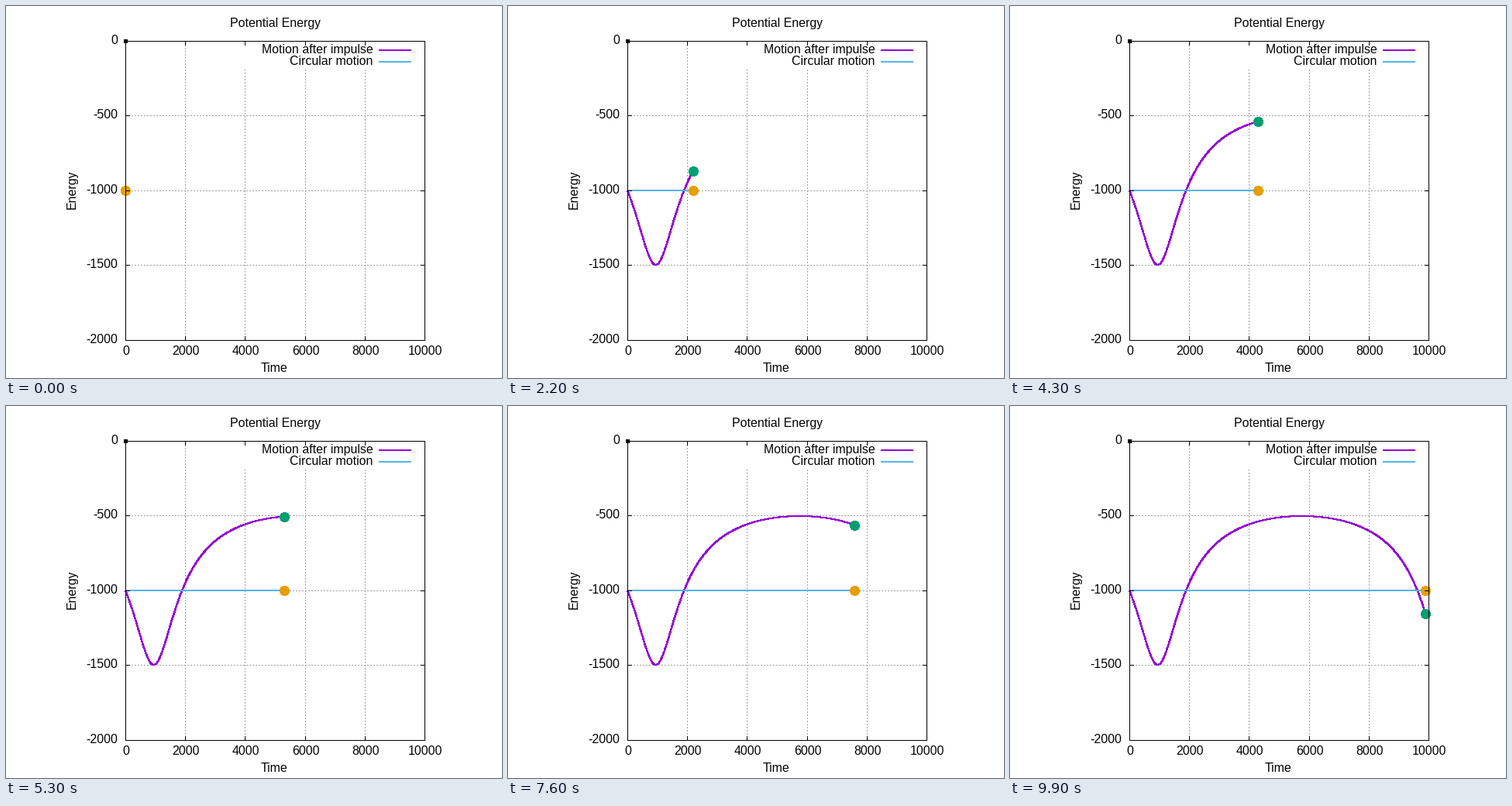
These frames come from a looping animation (640x480 px, 10000 ms). A matplotlib script:

```python
import numpy as np
import matplotlib.pyplot as plt
from matplotlib.animation import FuncAnimation
from matplotlib.patches import Circle

plt.rcParams.update({
    "font.family": "Liberation Sans",
    "text.hinting": "default",
    "path.simplify": False,
    "toolbar": "None",
})

DPI = 100
PX = 72 / DPI                      # one pixel in points
FRAMES, STEP = 100, 100
LEFT, RIGHT, TOP, BOTTOM = 154, 540, 45, 431
PURPLE, GREEN, BLUE, ORANGE = "#9400d3", "#009e73", "#56b4e9", "#e69f00"
GRID = "#a0a0a0"


def to_x(t):
    return np.floor(LEFT + 0.05 + np.asarray(t) * (RIGHT - LEFT) / 10000 + 0.5)


def to_y(u):
    return np.ceil(TOP - np.asarray(u) * (BOTTOM - TOP) / 2000 - 0.5)


# Kepler orbit with unit semi-latus rectum, entered inward at a right angle
# to the periapsis; times are scaled so that circular motion has n = 1/1000.
ECC = 0.4975
AXIS = 1 / (1 - ECC ** 2)
anomaly = np.linspace(-np.arccos(ECC), 2 * np.pi, 6000)
mean = anomaly - ECC * np.sin(anomaly)
orbit_t = 1000 * AXIS ** 1.5 * (mean - mean[0])
orbit_u = -1000 / (AXIS * (1 - ECC * np.cos(anomaly)))


def potential(t):
    return np.interp(t, orbit_t, orbit_u)


fig = plt.figure(figsize=(640 / DPI, 480 / DPI), dpi=DPI, facecolor="white")
ax = fig.add_axes([0, 0, 1, 1])
ax.set_xlim(0, 640)
ax.set_ylim(480, 0)
ax.axis("off")


def line(x, y, color="black", width=1, z=5, **kw):
    return ax.plot(x, y, color=color, lw=width * PX, zorder=z, snap=False,
                   solid_capstyle="butt", dash_capstyle="butt", **kw)[0]


def hline(y, x0, x1, **kw):
    """One pixel row, filled from column x0 to column x1."""
    line([x0, x1 + 1], [y + 0.5, y + 0.5], **kw)


def vline(x, y0, y1, **kw):
    """One pixel column, filled from row y1 up to row y0."""
    line([x + 0.5, x + 0.5], [y1 + 1, y0], **kw)


def label(x, y, text, ha="center", **kw):
    ax.text(x, y, text, ha=ha, va="baseline", fontsize=16 * PX, zorder=6, **kw)


def disc(x, y, r, color, z):
    return ax.add_patch(Circle((x + 0.5, y + 0.5), r, fc=color, ec="none", lw=0,
                               zorder=z, antialiased=False))


# Grid, ticks, border and labels
dots = dict(color=GRID, z=0, linestyle=(0, (2, 2)))
for i in range(6):
    x = int(to_x(2000 * i))
    label(x + 1, 450, str(2000 * i))
    if 0 < i < 5:
        vline(x, TOP if i == 1 else 80, BOTTOM, **dots)
        vline(x, BOTTOM - 5, BOTTOM)
        vline(x, TOP, TOP + 5)
for i in range(5):
    y = int(to_y(-500 * i))
    label(144.5, y + 4, str(-500 * i), ha="right")
    if 0 < i < 4:
        hline(y, LEFT, RIGHT, **dots)
        hline(y, LEFT, LEFT + 5)
        hline(y, RIGHT - 5, RIGHT)
for x in (LEFT, RIGHT):
    vline(x, TOP, BOTTOM)
for y in (TOP, BOTTOM):
    hline(y, LEFT, RIGHT)
disc(LEFT, TOP, 2.3, "black", 5)

label(347, 27, "Potential Energy")
label(346.5, 472, "Time")
label(90, 237, "Energy", rotation=90, rotation_mode="anchor")

# Key
for y, text, color in ((57, "Motion after impulse", PURPLE),
                       (72, "Circular motion", BLUE)):
    label(473.5, y + 4, text, ha="right")
    line([481, 523], [y, y], color, 2)

# Moving parts
curve = line([], [], PURPLE, 1.9, 1, solid_joinstyle="miter", antialiased=False)
green = disc(LEFT, 238, 5.8, GREEN, 2)
level = line([], [], BLUE, 2, 3)
orange = disc(LEFT, 238, 5.8, ORANGE, 4)


def update(i):
    now = i * STEP
    t = np.linspace(0, now, 20 * i + 1)
    x, y = to_x(now), to_y(potential(now))
    curve.set_data(to_x(t), to_y(potential(t)))
    level.set_data([LEFT, x], [238, 238])
    green.center = (x + 0.5, y + 0.5)
    orange.center = (x + 0.5, 238.5)
    return curve, green, level, orange


anim = FuncAnimation(fig, update, frames=FRAMES, interval=STEP,
                     repeat=True, repeat_delay=0, blit=False)
plt.show()
```
